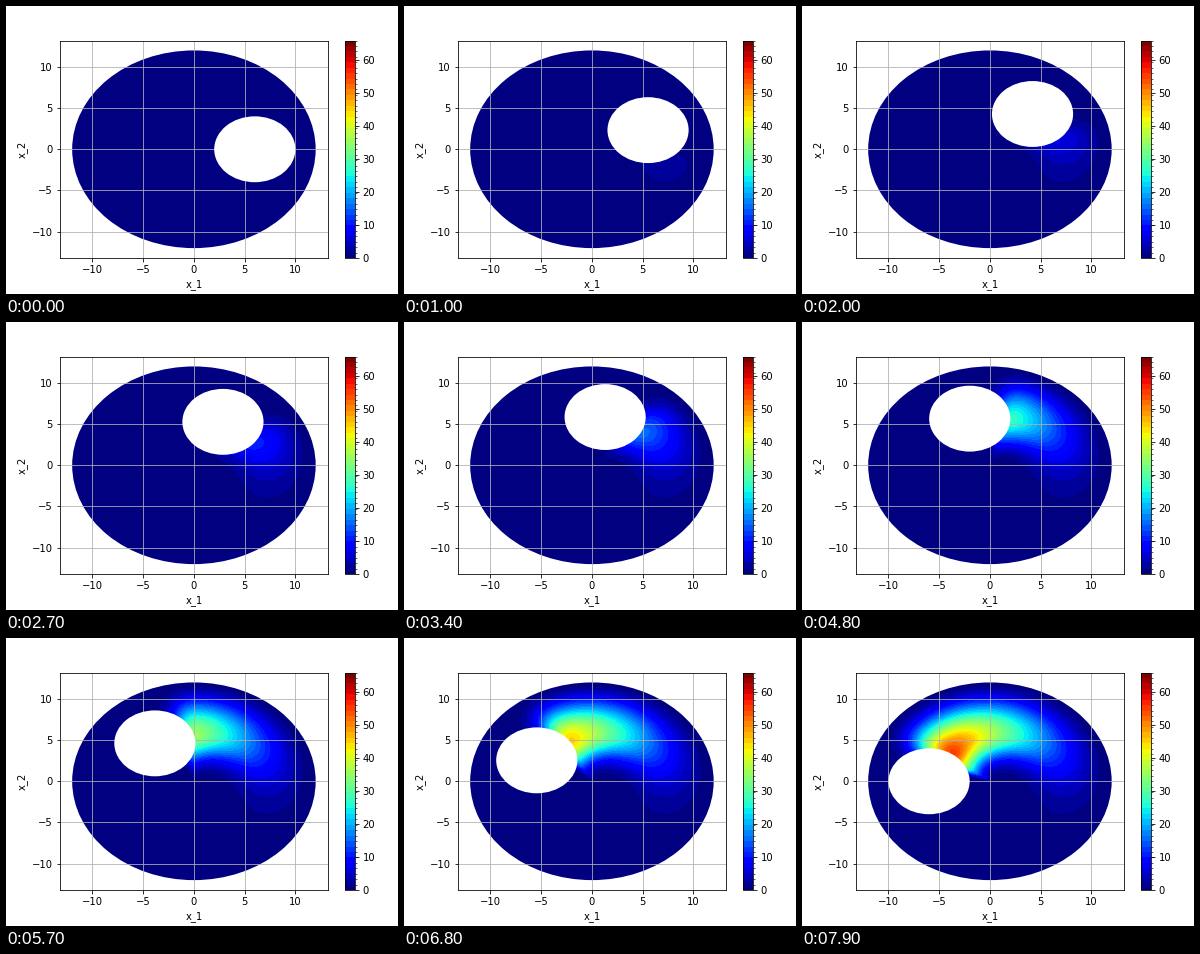
A matplotlib script that plays this animation: 392x288 px, repeating every 8000 ms.

```python
import numpy as np
import matplotlib.pyplot as plt
from matplotlib.animation import FuncAnimation
from matplotlib.colors import BoundaryNorm, ListedColormap
from matplotlib.cm import ScalarMappable
from matplotlib.patches import Circle

W, H, DPI = 392, 288, 72
FRAMES, INTERVAL = 80, 100
R_OUT, R_HOLE, R_PATH = 12, 4, 6
VMAX, BANDS = 66, 40

plt.rcParams.update({"font.family": "DejaVu Sans", "font.size": 10})

levels = np.linspace(0, VMAX, BANDS + 1)
cmap = ListedColormap(plt.get_cmap("jet")(np.linspace(0, 1, BANDS)))
norm = BoundaryNorm(levels, BANDS)

axis = np.linspace(-12.2, 12.2, 200)
X, Y = np.meshgrid(axis, axis)
R = np.hypot(X, Y)
PHI = np.mod(np.arctan2(Y, X) + 2, 2 * np.pi) - 2

# Wake left along the path: grows with angle, peaks on a slowly closing spiral
ridge = 6.8 - 0.75 * PHI
sigma = np.where(R > ridge, 2.9, 2.1)
profile = np.exp(-0.5 * ((R - ridge) / sigma) ** 2)
growth = 24 * 0.35 * np.log1p(np.exp(PHI / 0.35))
WAKE = growth * profile * np.clip(1 - (R / R_OUT) ** 8, 0, 1)


def field(theta):
    """Wake revealed up to a soft front trailing the hole."""
    front = 1 / (1 + np.exp(-(theta - PHI - 0.5) / 0.08))
    return np.clip(WAKE * front, 0, VMAX - 0.01)


fig = plt.figure(figsize=(W / DPI, H / DPI), dpi=DPI, facecolor="white")


def add_axes(left, bottom, width, height):
    return fig.add_axes([left / W, bottom / H, width / W, height / H])


ax = add_axes(54, 36, 267.84, 217.44)
ax.set(xlim=(-13.2, 13.2), ylim=(-13.2, 13.2), xlabel="x_1", ylabel="x_2",
       xticks=range(-10, 11, 5), yticks=range(-10, 11, 5))
ax.grid(True)

cax = add_axes(338.58, 36, 10.87, 217.44)
fig.colorbar(ScalarMappable(norm, cmap), cax=cax, ticks=range(0, 61, 10),
             spacing="proportional")
cax.minorticks_off()

disc = Circle((0, 0), R_OUT, transform=ax.transData)
hole = ax.add_patch(Circle((R_PATH, 0), R_HOLE, fc="white", ec="none", zorder=2.2))
layers = []


def update(i):
    theta = np.pi * i / (FRAMES - 1)
    while layers:
        layers.pop().remove()
    bands = ax.contourf(X, Y, field(theta), levels=levels, cmap=cmap,
                        norm=norm, zorder=1)
    bands.set_clip_path(disc)
    layers.append(bands)
    ax.set(xlim=(-13.2, 13.2), ylim=(-13.2, 13.2))
    hole.center = R_PATH * np.cos(theta), R_PATH * np.sin(theta)
    return [bands, hole]


anim = FuncAnimation(fig, update, frames=FRAMES, interval=INTERVAL,
                     init_func=lambda: update(0), repeat=True, repeat_delay=0)
plt.show()
```
